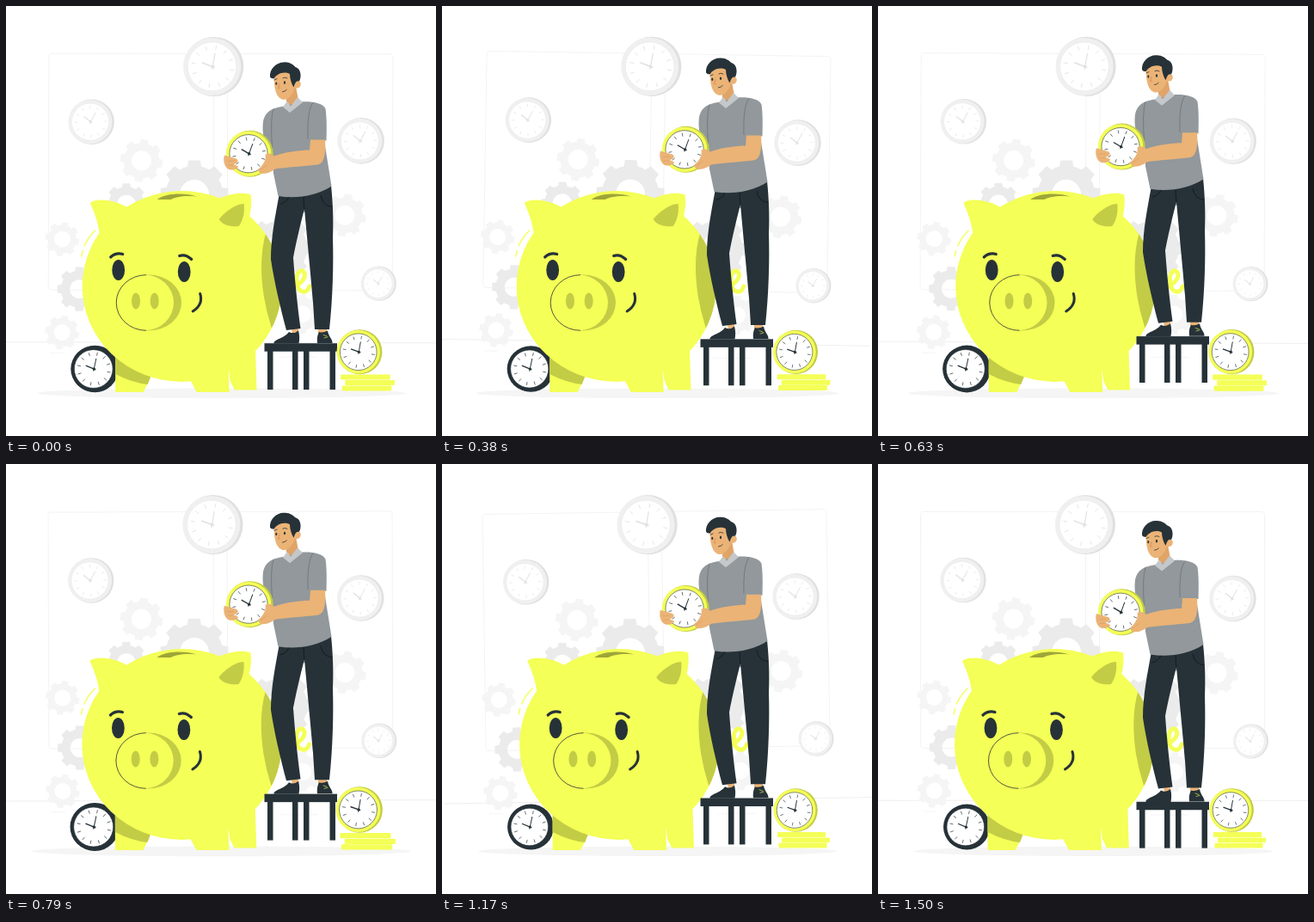
An HTML page that plays this animation: 500x500 px, repeating every 1540 ms.

```html
<!DOCTYPE html>
<html lang="en">
<head>
<meta charset="utf-8">
<title>Saving time</title>
<style>
  html, body { margin: 0; width: 100%; height: 100%; overflow: hidden; background: #fff; }
  svg { display: block; width: 100vw; height: 100vh; }
</style>
</head>
<body>
<svg id="stage" viewBox="0 0 500 500"></svg>
<script>
const INK = '#263238', LIME = '#f4ff57', OLIVE = '#c3cc45', SKIN = '#ebb376';
const SHIRT = '#92989b', PALE = '#f5f5f5', MIST = '#ebebeb';

const fill = (d, color, extra = '') => `<path d="${d}" fill="${color}" ${extra}/>`;
const line = (d, color, width, extra = '') =>
  `<path d="${d}" fill="none" stroke="${color}" stroke-width="${width}" stroke-linecap="round" ${extra}/>`;
const disc = (x, y, r, color, extra = '') => `<circle cx="${x}" cy="${y}" r="${r}" fill="${color}" ${extra}/>`;
const oval = (x, y, rx, ry, color, extra = '') =>
  `<ellipse cx="${x}" cy="${y}" rx="${rx}" ry="${ry}" fill="${color}" ${extra}/>`;
const box = (x, y, w, h, color, extra = '') =>
  `<rect x="${x}" y="${y}" width="${w}" height="${h}" fill="${color}" ${extra}/>`;
const group = (id, body) => `<g id="${id}">${body}</g>`;

function clock(x, y, r, turn, { rim, edge, face, ink, ring = ink }) {
  const f = r * 0.82;
  const ray = (deg, from, to, w) =>
    `<path d="M0 ${-from * f}V${-to * f}" transform="rotate(${deg})" stroke="${ink}" stroke-width="${w}"/>`;
  let ticks = '';
  for (let h = 0; h < 12; h++) ticks += ray(h * 30 + turn, 0.7, 0.88, r * 0.024);
  return `<g transform="translate(${x} ${y})">`
    + disc(r * 0.04, 0, r, edge) + disc(-r * 0.02, 0, r * 0.97, rim)
    + disc(-r * 0.02, 0, f, face, `stroke="${ring}" stroke-width="${r * 0.022}"`)
    + ticks + ray(turn - 80, -0.1, 0.46, r * 0.05) + ray(turn, -0.12, 0.56, r * 0.036)
    + disc(0, 0, r * 0.06, ink) + '</g>';
}

function gear(x, y, r, hole, color, turn = 0, teeth = 8) {
  const at = (rad, a) => `${(x + rad * Math.sin(a)).toFixed(1)} ${(y - rad * Math.cos(a)).toFixed(1)}`;
  const step = 2 * Math.PI / teeth, base = r * 0.83;
  const pts = [];
  for (let i = 0; i < teeth; i++) {
    const a = i * step + turn * Math.PI / 180;
    pts.push(at(base, a - step * 0.31), at(r, a - step * 0.22), at(r, a + step * 0.22),
      at(base, a + step * 0.31), at(base, a + step * 0.5));
  }
  const ring = `M${x - hole} ${y}a${hole} ${hole} 0 1 0 ${2 * hole} 0a${hole} ${hole} 0 1 0 ${-2 * hole} 0Z`;
  return fill(`M${pts.join('L')}Z${ring}`, color, 'fill-rule="evenodd"');
}

const faded = { rim: '#f0f0f0', edge: '#e0e0e0', face: '#fff', ink: '#e3e3e3', ring: '#ebebeb' };
const lime = { rim: LIME, edge: OLIVE, face: '#fff', ink: INK };
const dark = { rim: INK, edge: INK, face: '#fff', ink: INK };

const pane = x => box(x, 55.5, 192, 275, 'none', 'rx="4" stroke="#f0f0f0" stroke-width=".8"');

const backdrop = group('backdrop',
  pane(49.5) + pane(257.5)
  + line('M0 391.3H500', MIST, 0.8)
  + line('M52 404H68M318 408H362M205 407H240', '#f3f3f3', 0.8)
  + gear(157.5, 180, 25, 11.5, PALE, 8)
  + gear(65.5, 271.5, 20, 9.5, PALE, 10)
  + gear(65.5, 380, 20, 9.5, PALE, 10)
  + gear(394, 243, 25, 11.5, PALE, 10)
  + gear(345, 358, 23, 10, PALE)
  + gear(85.5, 329.5, 26, 11, MIST)
  + gear(140, 231, 25, 11, MIST)
  + gear(219, 219, 40, 17, MIST)
  + gear(319, 281, 38, 16, MIST)
  + clock(240, 70.5, 34.6, 10, faded)
  + clock(98.3, 135, 26.3, 28, faded)
  + clock(411.8, 156.5, 26.8, 28, faded)
  + clock(433, 322.3, 20.2, 28, faded));

const pig = group('pig',
  line('M316 328C334 332 349.500 320 347.500 311C344.500 304 336.500 309 338.500 322C339.500 333.500 350.500 336 353 326', LIME, 5)
  + line('M104 261Q95 270 91.5 279M89.5 284.5L88 291', LIME, 1.4)
  + fill('M256 400L261 436L266 446.500H291.800L290 390Z', LIME)
  + fill('M127.500 405V449H160C163 443 166 437 168 430Z', LIME)
  + fill('M127.500 408V428Q147 438 165 440L169 430Z', OLIVE)
  + fill('M206 410L213 432L222 449H260L258.500 410Z', LIME)
  + fill('M109 264C107 250 103 240 98 229C105 223 126 225 141 234L132 252Z', LIME)
  + '<clipPath id="belly"><ellipse cx="205" cy="326" rx="116" ry="111"/></clipPath>'
  + oval(205, 326, 116, 111, LIME)
  + fill('M303 262C296 285 296 310 300 337Q303 355 309 374L330 380V262Z', OLIVE, 'clip-path="url(#belly)"')
  + fill('M245 226C258 218 276 216 285 219.500C287 234 283 249 277 264L258 256Z', LIME)
  + fill('M277 230C267 230 253 241 248 248C252 255 262 257 271 256C276 249 278 240 277 230Z', OLIVE)
  + fill('M176 225C186 217 210 217 222 221.500C208 220 197 222 192 225Z', '#9ea638')
  + oval(131, 307, 7.4, 12, INK) + oval(207.500, 309, 7.400, 12, INK)
  + line('M122 292Q128 286.500 136 288.500M202 290.500Q209 288 216 294.500', INK, 3.2)
  + line('M226 334.500Q230 347 217.500 355', INK, 3)
  + oval(166.300, 345, 38, 32.500, OLIVE)
  + oval(161.800, 345, 33.500, 32.300, LIME)
  + line('M163 312.700A34.500 32.300 0 0 0 163 377.300', INK, 0.8)
  + oval(151.300, 343, 5, 9.500, OLIVE) + oval(173, 343, 5, 9.500, OLIVE));

const stool = box(300.5, 392.8, 84.5, 9.5, INK)
  + [304, 333, 346, 376.5].map(x => box(x, 401, 6.5, 45.7, INK)).join('');

const legs = fill('M332 374L333 384L340 382V374ZM363 374V382L373 380V374Z', SKIN)
  + fill('M318 218C313 245 308 270 308 295C312 322 319 351 326 377.500L342.500 375.500C339 350 336 320 334 293'
    + 'C338 272 343 252 347 236C350 270 355 320 357 345L359 376.500H376C380 340 381 300 380 270C381 250 380 228 378 209Z', INK)
  + line('M346 223L347 240M366 221Q368 233 379 234M329 222Q327 229 319 231', '#0e161a', 0.8)
  + fill('M311.500 393C311 388 324 387 329 379.500Q335 382.500 340 378Q342 385 340.500 393Z', INK)
  + fill('M364 379.500Q369 381 374 378C375 385 380 388 379.500 392.500H362Q361 385 364 379.500Z', INK)
  + line('M369 383L373 384.500M370 386.500L374 385.500', LIME, 0.6);

const head = fill('M326 104L337 94L340 110L331 119L326 113Z', '#e0a468')
  + disc(338, 91.5, 4.8, SKIN)
  + fill('M312 81C311 92 313 106 321 109C328 111 334 103 336 95L337 82L326 74Z', SKIN)
  + fill('M307 83C306 74 314 66 323 66C330 65.500 334 69 336.500 71.500C343 73 344 83 341 88'
    + 'C337 87 336 91 334.500 95C332 91 330 85 330 79.500C323 76 315 79 311.500 85Q308 85 307 83Z', INK)
  + oval(314.300, 90.700, 1, 1.7, INK) + oval(324, 89.700, 1.1, 1.8, INK)
  + line('M312 86.500L315 85.300M322 84.300Q325 82.800 327 84.500', INK, 0.8)
  + line('M318 91L316.500 96L318.500 96.200', '#cf8550', 0.7)
  + line('M321.500 100.300Q324.800 100 326.300 98', INK, 0.8);

const torso = fill('M323 117C312 119 302 121 299 135C297 150 302 166 309 170L311 195L316.500 221.500'
    + 'C338 225 362 221 378.500 210L370 157H372.500C373 143 373 130 371.500 120C369 113 354 111 343 112Z', SHIRT)
  + line('M311 120Q307 131 309.500 166M357 113Q350 121 351 155', '#5e676b', 0.6)
  + fill('M327 111L322 118L330 124.500L345 112.500L339 106.500L331 117Z', '#c4c8ca');

const hands = fill('M354 156H371C372 170 371 184 362 185C345 187 326 188 313 190C308 194 300 197 295 194.500L293 190.500'
    + 'C299 186 303 179 301.500 173C306 171 309 172 311.500 175C326 170 342 168 353 168Z', SKIN)
  + fill('M254 174C252 180 254 188 259 190.500C264 192 270 190 270 187L264.500 184.500C271 184 271 178 266 177.500Z', SKIN)
  + line('M296 191L303 186M257 181L264.500 180.500M258 185.500H264', '#d49a5c', 0.6);

const man = group('man', stool + legs + head + torso + clock(282.6, 172.3, 27, 20, lime) + hands);

const coins = [[390, 428], [395, 434.4], [391.5, 440.6]]
  .map(([x, y]) => box(x, y, 56, 5.9, LIME, 'rx="1"')).join('');

document.getElementById('stage').innerHTML = backdrop
  + group('shadow', oval(250.5, 450.3, 208.5, 5.7, PALE))
  + group('alarm', clock(102.3, 422, 26.5, 12, dark))
  + pig + man
  + group('savings', coins + clock(410.5, 402.5, 25.3, 10, lime));

// Each track is a list of [phase, value], read linearly.
const tracks = {
  sway: [[0, 0], [.25, 1], [.75, -1], [1, 0]],
  float: [[0, 0], [.5, -10], [1, 0]],
  shake: [[0, 0], [.1, -1], [.2, 2], [.3, -4], [.4, 4], [.5, -4], [.6, 4], [.7, -4], [.8, 2], [.9, -1], [1, 0]],
  beat: [[0, 1], [.1, 1.1], [.3, 1], [.4, 1], [.5, 1.1], [.6, 1], [1, 1]]
};

function read(track, p) {
  let i = 1;
  while (i < track.length - 1 && p > track[i][0]) i++;
  const [p0, v0] = track[i - 1], [p1, v1] = track[i];
  return v0 + (v1 - v0) * (p - p0) / (p1 - p0);
}

const LOOP = 1540, STEPS = 37, RATE = 24;
const beating = { shadow: [250.5, 450.3], savings: [418.5, 412], alarm: [102.8, 422] };
const place = (id, transform) => document.getElementById(id).setAttribute('transform', transform);

function draw(ms) {
  const step = Math.min(STEPS - 1, Math.floor((ms % LOOP + 2) * RATE / 1000));
  const p = ((step + 1) / STEPS + 0.002) % 1;
  place('backdrop', `rotate(${read(tracks.sway, p)} 250 222)`);
  place('man', `translate(0 ${read(tracks.float, p)})`);
  place('pig', `translate(${read(tracks.shake, p)} 0)`);
  const s = read(tracks.beat, p);
  for (const [id, [x, y]] of Object.entries(beating)) {
    place(id, `translate(${x} ${y}) scale(${s}) translate(${-x} ${-y})`);
  }
}

const start = performance.now();
function tick() {
  draw(performance.now() - start);
  requestAnimationFrame(tick);
}
tick();
</script>
</body>
</html>
```
